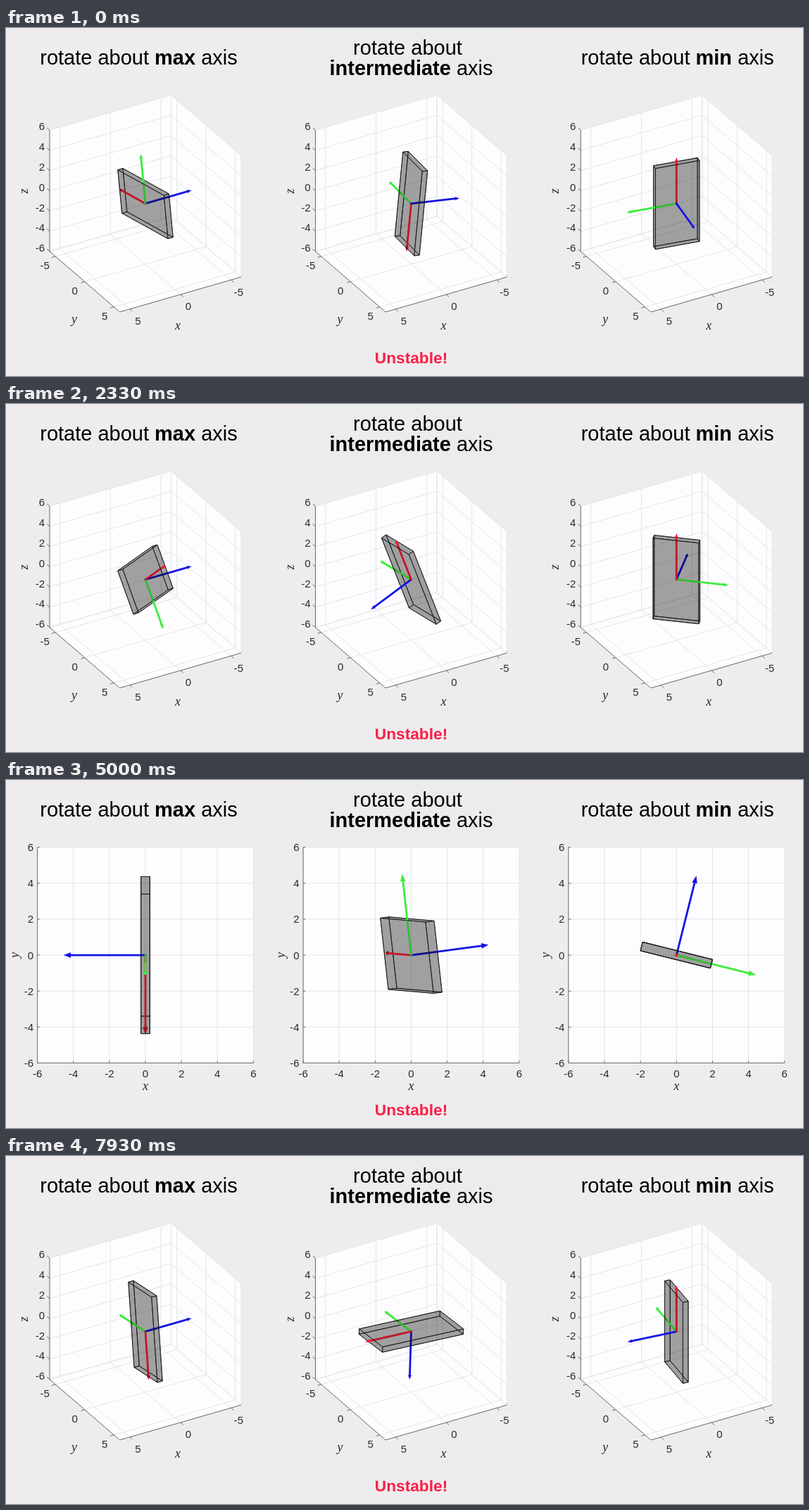
Recreate the animation shown at these times as an HTML page. Size 1132 px wide and 495 px high, loop 8 s.

```html
<!DOCTYPE html>
<html lang="en">
<head>
<meta charset="utf-8">
<title>Rotation about principal axes</title>
<style>
html, body { margin: 0; width: 100%; height: 100%; overflow: hidden; background: #eeecee; }
svg { display: block; width: 1132px; height: 495px; }
text { font-family: "Liberation Sans", Arial, sans-serif; fill: #000; text-anchor: middle; }
.title { font-size: 29px; }
.b { font-weight: bold; }
.warn { font-size: 22.7px; font-weight: bold; fill: #fa1e46; }
.tick { font-size: 15px; fill: #2a2a2a; }
.end { text-anchor: end; }
.name { font: italic 18px "Liberation Serif", "Times New Roman", serif; fill: #2a2a2a; }
.wall { fill: #fdfcfe; }
.grid { stroke: #e5e4e6; fill: none; }
.axis { stroke: #6a6a6c; fill: none; }
.face { fill: #000; fill-opacity: .205; stroke: #161616; stroke-width: .8; stroke-linejoin: round; }
</style>
</head>
<body>
<svg viewBox="0 0 1132 495" xmlns="http://www.w3.org/2000/svg">
  <rect width="1132" height="495" fill="#eeecee"/>
  <rect x="414" width="320" height="84" fill="#ecedeb"/>
  <text class="title" x="188.5" y="52">rotate about <tspan class="b">max</tspan> axis</text>
  <text class="title" x="570.5" y="38">rotate about</text>
  <text class="title" x="575.5" y="67"><tspan class="b">intermediate</tspan> axis</text>
  <text class="title" x="953.7" y="52">rotate about <tspan class="b">min</tspan> axis</text>
  <text class="warn" x="575.5" y="477">Unstable!</text>
  <g id="space"></g>
  <g id="plan"></g>
  <g id="bodies"></g>
</svg>
<script>
const $ = id => document.getElementById(id);
const CENTERS = [198, 575.5, 952.3];
const HALF = [4, 2, 0.25];                 // half sizes of the box
const INERTIA = [16.25, 64.25, 80];
const COLORS = ['#f51a32', '#3cee3c', '#1414e6'];
const ARROW = 4.5, HEAD = 0.36, HEAD_W = 0.15;
const LOOP = 8000, RUN = 9.2, LEAD = 1 / 15;
const PLAN_FROM = 35, PLAN_TO = 69;        // steps seen from above

const C = Math.sqrt(3) / 2;
const VIEWS = {
  space: { right: [-C, 0.5, 0], up: [-0.25, -C / 2, C], depth: [C / 2, 0.75, 0.5], scale: 16.6, cy: 249.7 },
  plan: { right: [1, 0, 0], up: [0, 1, 0], depth: [0, 0, 1], scale: 25.57, cy: 249.1 }
};

const dot = (a, b) => a[0] * b[0] + a[1] * b[1] + a[2] * b[2];
const cross = (a, b) => [a[1] * b[2] - a[2] * b[1], a[2] * b[0] - a[0] * b[2], a[0] * b[1] - a[1] * b[0]];
const times = (a, s) => a.map(v => v * s);
const add = (...vs) => [0, 1, 2].map(i => vs.reduce((sum, v) => sum + v[i], 0));
const project = (view, p, cx = 0) =>
  [cx + view.scale * dot(view.right, p), view.cy - view.scale * dot(view.up, p)];
const fmt = p => p.map(v => v.toFixed(2)).join(' ');
const path = (pts, close) => 'M' + pts.map(fmt).join('L') + (close ? 'Z' : '');
const tag = (cls, d) => `<path class="${cls}" d="${d}"/>`;
const text = (cls, x, y, s, extra = '') => `<text class="${cls}" x="${x}" y="${y}"${extra}>${s}</text>`;
const range = (from, to, step) => {
  const out = [];
  for (let v = from; v <= to; v += step) out.push(v);
  return out;
};

// ---- Free rigid body: state is [spin, e1, e2, e3] ----
function rate([w, ...e]) {
  const I = INERTIA;
  const spin = [
    (I[1] - I[2]) * w[1] * w[2] / I[0],
    (I[2] - I[0]) * w[2] * w[0] / I[1],
    (I[0] - I[1]) * w[0] * w[1] / I[2]
  ];
  const world = add(...e.map((v, i) => times(v, w[i])));
  return [spin, ...e.map(v => cross(world, v))];
}

function advance(s, h) {
  const shift = (k, f) => s.map((v, i) => add(v, times(k[i], f)));
  const a = rate(s), b = rate(shift(a, h / 2)), c = rate(shift(b, h / 2)), d = rate(shift(c, h));
  return s.map((v, i) => add(v, times(add(a[i], times(b[i], 2), times(c[i], 2), d[i]), h / 6)));
}

// Poses every 1/30 s over the whole run
function simulate(spin) {
  let s = [spin, [0, 0, 1], [0, 1, 0], [-1, 0, 0]];
  const poses = [];
  for (let n = 0; n <= RUN * 30; n++) {
    poses.push(s.slice(1));
    for (let i = 0; i < 10; i++) s = advance(s, 1 / 300);
  }
  return poses;
}

const RUNS = [[0, 0, 6], [0.06, 6, 0.06], [6, 0, 0]].map(simulate);

// ---- Axes ----
function spaceAxes(cx) {
  const view = VIEWS.space;
  const at = (x, y, z) => project(view, [x, y, z], cx);
  const line = (...pts) => path(pts.map(p => at(...p)));
  const area = pts => path(pts.map(p => at(...p)), true);
  const walls = area([[6, -6, -6], [-6, -6, -6], [-6, 6, -6], [6, 6, -6]]) +
    area([[6, -6, -6], [-6, -6, -6], [-6, -6, 6], [6, -6, 6]]) +
    area([[-6, -6, -6], [-6, 6, -6], [-6, 6, 6], [-6, -6, 6]]);
  let grid = '', labels = '';
  let axis = line([6, -6, 6], [6, -6, -6], [6, 6, -6], [-6, 6, -6]);
  for (const v of [-6, -5, 0, 5, 6]) {
    grid += line([v, 6, -6], [v, -6, -6], [v, -6, 6]) + line([6, v, -6], [-6, v, -6], [-6, v, 6]);
  }
  for (const v of [-5, 0, 5]) {
    axis += line([v, 6, -6], [v, 6.45, -6]) + line([6, v, -6], [6.35, v, -6]);
    labels += text('tick', cx + 61 - 14.3 * v, 401.3 + 4.1 * v, v) +
      text('tick', cx - 100.3 + 8.5 * v, 379.2 + 7.2 * v, v);
  }
  for (const v of range(-6, 6, 2)) {
    grid += line([6, -6, v], [-6, -6, v], [-6, 6, v]);
    axis += line([6, -6, v], [6, -6.45, v]);
    labels += text('tick end', cx - 143, 231.8 - 14.4 * v, v);
  }
  labels += text('name', cx + 46, 429, 'x') + text('name', cx - 101, 420, 'y') +
    text('name', cx - 167, 232, 'z', ` transform="rotate(-90 ${cx - 167} 232)"`);
  return tag('wall', walls) + tag('grid', grid) + tag('axis', axis) + labels;
}

function planAxes(cx) {
  const view = VIEWS.plan;
  const at = (x, y) => project(view, [x, y, 0], cx);
  const line = (...pts) => path(pts.map(p => at(...p)));
  const wall = path([at(-6, -6), at(6, -6), at(6, 6), at(-6, 6)], true);
  let grid = '', labels = '', axis = line([-6, 6], [-6, -6], [6, -6]);
  for (const v of range(-6, 6, 2)) {
    grid += line([v, -6], [v, 6]) + line([-6, v], [6, v]);
    axis += line([v, -6], [v, -5.87]) + line([-6, v], [-5.87, v]);
    const [x] = at(v, 0), [, y] = at(0, v);
    labels += text('tick', x, 423.3, v) + text('tick end', cx - 159, y + 5.5, v);
  }
  labels += text('name', cx, 441, 'x') +
    text('name', cx - 180, 249, 'y', ` transform="rotate(-90 ${cx - 180} 249)"`);
  return tag('wall', wall) + tag('grid', grid) + tag('axis', axis) + labels;
}

// ---- Box and arrows ----
function faces(view, e, cx, front) {
  let out = '';
  for (let i = 0; i < 3; i++) {
    const j = (i + 1) % 3, k = (i + 2) % 3;
    const side = (dot(e[i], view.depth) >= 0) === front ? 1 : -1;
    const corner = (a, b) => project(view,
      add(times(e[i], side * HALF[i]), times(e[j], a * HALF[j]), times(e[k], b * HALF[k])), cx);
    out += tag('face', path([corner(1, 1), corner(1, -1), corner(-1, -1), corner(-1, 1)], true));
  }
  return out;
}

const shaft = (a, b, color) =>
  `<path d="${path([a, b])}" stroke="${color}" stroke-width="2.8" stroke-linecap="round"/>`;

function tip(view, e, i, cx) {
  const at = r => project(view, times(e[i], r), cx);
  const base = at(ARROW - HEAD), end = at(ARROW + 0.05);
  const dx = end[0] - base[0], dy = end[1] - base[1], len = Math.hypot(dx, dy) || 1;
  const w = HEAD_W * view.scale / len;
  const left = [base[0] - dy * w, base[1] + dx * w], right = [base[0] + dy * w, base[1] - dx * w];
  const round = 0.09 * view.scale * Math.abs(dot(e[i], view.depth));
  return shaft(at(HALF[i]), base, COLORS[i]) +
    `<path d="${path([left, end, right], true)}" fill="${COLORS[i]}"/>` +
    `<circle cx="${base[0].toFixed(2)}" cy="${base[1].toFixed(2)}" r="${round.toFixed(2)}" fill="${COLORS[i]}"/>`;
}

function body(view, e, cx) {
  const depth = i => dot(e[i], view.depth);
  const order = [0, 1, 2].sort((a, b) => depth(a) - depth(b));
  const tips = near => order.filter(i => (depth(i) > 0) === near).map(i => tip(view, e, i, cx)).join('');
  const inner = order.map(i =>
    shaft(project(view, [0, 0, 0], cx), project(view, times(e[i], HALF[i]), cx), COLORS[i])).join('');
  return tips(false) + faces(view, e, cx, false) + inner + faces(view, e, cx, true) + tips(true);
}

// ---- Playback: steps last 130 and 70 ms in turn ----
$('space').innerHTML = CENTERS.map(spaceAxes).join('');
$('plan').innerHTML = CENTERS.map(planAxes).join('');
let shown = -1;

function draw(ms) {
  const t = ms % LOOP;
  const step = 2 * Math.floor(t / 200) + (t % 200 >= 130 ? 1 : 0);
  if (step === shown) return;
  shown = step;
  const name = step >= PLAN_FROM && step < PLAN_TO ? 'plan' : 'space';
  for (const id of ['space', 'plan']) $(id).style.display = id === name ? '' : 'none';
  const time = (step / 10 - LEAD + RUN) % RUN;
  const n = Math.round(time * 30);
  $('bodies').innerHTML = CENTERS.map((cx, i) => body(VIEWS[name], RUNS[i][n], cx)).join('');
}

function tick() {
  draw(performance.now());
  requestAnimationFrame(tick);
}
tick();
</script>
</body>
</html>
```
